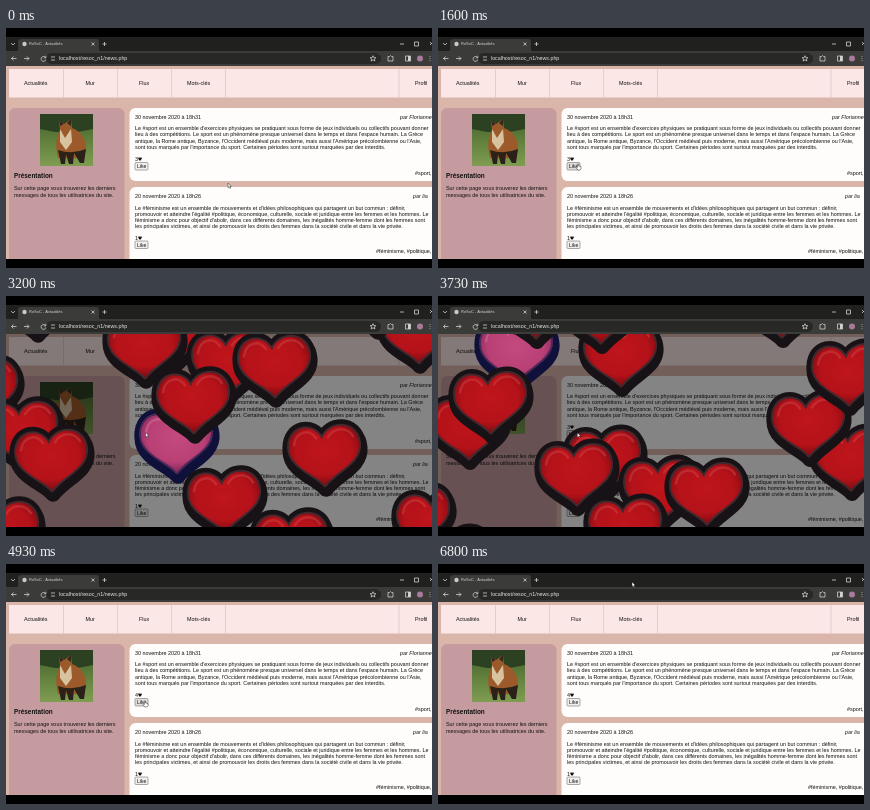
An HTML page for the animation above (6.87 s loop, 426 px wide and 240 px high).

```html
<!DOCTYPE html>
<html lang="fr">
<head>
<meta charset="utf-8">
<title>Actualités</title>
<style>
html, body { margin: 0; width: 100%; height: 100%; overflow: hidden; background: #000; }
svg { display: block; width: 100vw; height: 100vh; }
text { font-family: "Liberation Sans", Arial, sans-serif; font-size: 5.42px; fill: #111; white-space: pre; }
.bold { font-size: 6.4px; font-weight: bold; }
.it { font-style: italic; }
.ui { font-size: 4px; fill: #d8d8d4; }
.url { font-size: 5.3px; fill: #e4e4e0; }
.icon { fill: none; stroke: #d0d0cc; stroke-width: .8; }
.like { fill: #efefef; stroke: #77736c; stroke-width: .6; }
.label { font-size: 5px; }
.sym { font-family: "DejaVu Sans", sans-serif; font-size: 5px; }
</style>
</head>
<body>
<svg viewBox="0 0 426 240" preserveAspectRatio="none">
  <defs>
    <clipPath id="view"><rect y="38" width="426" height="193"/></clipPath>
    <clipPath id="photo"><rect x="34" y="86" width="53" height="52"/></clipPath>
    <radialGradient id="red" cx=".5" cy=".42" r=".62">
      <stop offset="0" stop-color="#c0151c"/><stop offset=".65" stop-color="#b51219"/><stop offset="1" stop-color="#780a10"/>
    </radialGradient>
    <radialGradient id="pink" cx=".5" cy=".42" r=".62">
      <stop offset="0" stop-color="#c44a7e"/><stop offset=".65" stop-color="#b84075"/><stop offset="1" stop-color="#7b2455"/>
    </radialGradient>
    <linearGradient id="grass" x2="0" y2="1">
      <stop offset="0" stop-color="#3f5a2c"/><stop offset=".45" stop-color="#5d7c3a"/><stop offset="1" stop-color="#7f9d52"/>
    </linearGradient>
    <path id="shape" d="M1 29C-8 18-35 11-35-9C-35-30-11-35-2-17C4-35 33-36 35-13C37 6 14 13 1 29Z"/>
    <path id="gloss" fill="none" stroke-linecap="round" stroke-width="2.500" d="M-30-11C-28-25-15-28-8-18M4-19C10-29 23-30 29-20"/>
  </defs>

  <g clip-path="url(#view)">
    <g id="page">
      <rect y="38" width="426" height="193" fill="#dab6aa"/>
      <rect x="3" y="41" width="423" height="28.5" fill="#fbe7e6"/>
      <path d="M57.5 41v28.5M111.5 41v28.5M165.5 41v28.5M219.5 41v28.5M393 41v28.5" stroke="#e8c3cb" stroke-width=".8"/>
      <rect x="3" y="80" width="115.5" height="165" rx="6" fill="#c69b9f"/>
      <g clip-path="url(#photo)">
        <rect x="34" y="86" width="53" height="52" fill="url(#grass)"/>
        <path d="M34 86h53v15q-26 7-53 0z" fill="#2c4022"/>
        <path d="M52 130C49 118 50 108 54 102L53 92L58 96L65 91L66 100C75 103 81 112 80 122L76 130Z" fill="#9c5a2a"/>
        <path d="M54 101l5 9l6-9l1 13l-6 8l-6-8z" fill="#d8c3a0"/>
        <path d="M52 122l3 14h4l1-10l3 10h4l1-11l6 10h4l2-14q-14 6-28 1z" fill="#2a2118"/>
        <path d="M53 92l1.500 6l3-2zM65 91l-4 4l4 3z" fill="#35261a"/>
      </g>
      <rect x="123.5" y="80" width="315" height="73" rx="6" fill="#fefdfc"/>
      <rect x="123.5" y="159" width="315" height="85" rx="6" fill="#fefdfc"/>
      <g id="copy"></g>
      <rect id="like" class="like" x="129" y="134.5" width="13" height="7.5" rx="1"/>
      <rect class="like" x="129" y="213" width="13" height="7.5" rx="1"/>
      <text class="label" x="131" y="140">Like</text>
      <text class="label" x="131" y="218.5">Like</text>
      <text id="count" x="129" y="133">3</text>
      <text x="129" y="212">1</text>
      <text class="sym" x="131.7" y="133">♥</text>
      <text class="sym" x="131.7" y="212">♥</text>
    </g>
    <g id="rain">
      <rect y="38" width="426" height="193" fill="#000" opacity=".48"/>
      <g id="hearts"></g>
    </g>
  </g>

  <g id="chrome">
    <rect y="9" width="426" height="15" fill="#20211f"/>
    <path d="M10 24q2 0 2-3v-7q0-3 3-3h75q3 0 3 3v7q0 3 2 3z" fill="#3b3c39"/>
    <rect y="23" width="426" height="15" fill="#3b3c39"/>
    <rect x="40" y="25" width="335" height="11" rx="5.5" fill="#282926"/>
    <circle cx="18.5" cy="16" r="2.2" fill="#c9c9c5"/>
    <text class="ui" x="23" y="17.4">ReSoC - Actualités</text>
    <path class="icon" d="M5 15l2 2l2-2M85.5 14.5l3 3m0-3l-3 3M96.5 16h4m-2-2v4M394 16h4M408.5 14h4v4h-4zM424 14l3 3m0-3l-3 3"/>
    <path class="icon" d="M10.5 30.5h-5m2-2l-2 2l2 2M18 30.5h5m-2-2l2 2l-2 2M40 29M39.500 29.500a2.400 2.400 0 1 0 .4 2M39.900 27.800v2h-2"/>
    <path class="icon" d="M45 29h4M45 32h4"/>
    <text class="url" x="53" y="32.3">localhost/resoc_n1/news.php</text>
    <path class="icon" d="M367 27.7l.9 2h2l-1.6 1.3l.6 2l-1.9-1.2l-1.9 1.2l.6-2l-1.6-1.3h2z"/>
    <path class="icon" d="M382 28.5h1.5q1-2 2 0h1.5v4.5h-5zM399.5 28h5v5h-5z"/>
    <path d="M402 28h2.5v5H402z" fill="#d0d0cc"/>
    <circle cx="414" cy="30.5" r="3" fill="#a8799b"/>
    <path class="icon" d="M424 28v.8m0 1.4v.8m0 1.4v.8"/>
  </g>
  <g id="cursor" stroke="#111" stroke-width=".45" fill="#fff">
    <path id="arrow" d="M0 0v4.7l1.1-1l.8 1.7l.8-.4l-.8-1.7h1.5z"/>
    <path id="hand" d="M-.7 0q.7-.8 1.3 0v2l2.3.5l.2 2l-1 1.5h-2.3l-2-2.5l.6-.5l.9.6z"/>
  </g>
</svg>
<script>
const LOOP = 6870, RAIN_START = 2600, RAIN_END = 4700;
const FALL = 0.24, POSE = 3200;      // px per ms, time of the listed heart places
const TOP = -346, CYCLE = 640;       // hearts leave below and come back above
const NS = "http://www.w3.org/2000/svg";
const $ = id => document.getElementById(id);

function add(parent, tag, attrs, text) {
  const el = document.createElementNS(NS, tag);
  for (const k in attrs) el.setAttribute(k, attrs[k]);
  if (text) el.textContent = text;
  parent.append(el);
  return el;
}

function write(x, y, lines, cls = "", gap = 6.35) {
  lines.forEach((line, i) => add($("copy"), "text", { x, y: y + i * gap, class: cls }, line));
}

const nav = { "Actualités": 18, "Mur": 79.5, "Flux": 133, "Mots-clés": 181, "Profil": 409 };
for (const label in nav) write(nav[label], 57, [label]);
write(8, 150, ["Présentation"], "bold");
write(8, 162.3, ["Sur cette page vous trouverez les derniers", "messages de tous les utilisatrices du site."]);
write(129, 90.6, ["30 novembre 2020 à 18h31"]);
write(394, 90.6, ["par Florianne"], "it");
write(129, 102, [
  "Le #sport est un ensemble d'exercices physiques se pratiquant sous forme de jeux individuels ou collectifs pouvant donner",
  "lieu à des compétitions. Le sport est un phénomène presque universel dans le temps et dans l'espace humain. La Grèce",
  "antique, la Rome antique, Byzance, l'Occident médiéval puis moderne, mais aussi l'Amérique précolombienne ou l'Asie,",
  "sont tous marqués par l'importance du sport. Certaines périodes sont surtout marquées par des interdits."
]);
write(409, 147, ["#sport,"]);
write(129, 169.5, ["20 novembre 2020 à 18h26"]);
write(407, 169.5, ["par lia"], "it");
write(129, 181.5, [
  "Le #féminisme est un ensemble de mouvements et d'idées philosophiques qui partagent un but commun : définir,",
  "promouvoir et atteindre l'égalité #politique, économique, culturelle, sociale et juridique entre les femmes et les hommes. Le",
  "féminisme a donc pour objectif d'abolir, dans ces différents domaines, les inégalités homme-femme dont les femmes sont",
  "les principales victimes, et ainsi de promouvoir les droits des femmes dans la société civile et dans la vie privée."
], "", 6.25);
write(370, 225, ["#féminisme, #politique,"]);

// x, y, 1 for pink; painted back to front
const hearts = [
  [30, 6, 0], [-25, 95, 0], [166, 38, 0], [138, 52, 0], [15, 137, 0], [412, 37, 0],
  [222, 68, 0], [268, 71, 0], [170, 147, 1], [187, 107, 0], [318, 160, 0],
  [45, 165, 0], [218, 206, 0], [427, 228, 0], [285, 248, 0], [-4, 237, 0],
  [425, -213, 0], [345, -208, 1], [182, -67, 0], [78, -71, 1], [97, -115, 0],
  [162, -110, 0], [343, -116, 0], [370, 3, 0], [410, -48, 0], [52, -20, 0],
  [150, -302, 0], [262, -318, 1], [35, -330, 0], [390, -345, 0]
].map(([x, y, pink]) => {
  const el = add($("hearts"), "g", {});
  const edge = pink ? "#10113a" : "#171216";
  const use = attrs => add(el, "use", { href: "#shape", "stroke-linejoin": "round", ...attrs });
  use({ transform: "translate(1 4)", fill: edge, stroke: edge, "stroke-width": 15 });
  use({ fill: edge, stroke: edge, "stroke-width": 13 });
  use({ stroke: pink ? "#4a2858" : "#43282e", "stroke-width": 4 });
  use({ fill: pink ? "url(#pink)" : "url(#red)" });
  add(el, "use", { href: "#gloss", stroke: pink ? "#d979a2" : "#d0484c", opacity: 0.45 });
  return { el, x, y };
});

// time, x, y of the pointer
const path = [
  [0, 222, 155], [300, 221, 154], [1450, 140, 136], [5000, 139, 137], [5850, 194, 18]
];
const ease = p => p * p * (3 - 2 * p);

function pointer(t) {
  const i = path.findIndex(p => p[0] > t);
  if (i < 0) return path.at(-1).slice(1);
  const [t0, x0, y0] = path[i - 1], [t1, x1, y1] = path[i];
  const p = ease((t - t0) / (t1 - t0));
  return [x0 + (x1 - x0) * p, y0 + (y1 - y0) * p];
}

const show = (el, on) => { el.style.display = on ? "" : "none"; };
const wrap = y => ((y - TOP) % CYCLE + CYCLE) % CYCLE + TOP;

function draw() {
  const t = performance.now() % LOOP;
  const raining = t >= RAIN_START && t < RAIN_END;
  show($("rain"), raining);
  for (const { el, x, y } of hearts)
    el.setAttribute("transform", `translate(${x} ${wrap(y + (t - POSE) * FALL)})`);

  const [x, y] = pointer(t);
  const hover = x < 143 && y > 133 && y < 143;
  $("cursor").setAttribute("transform", `translate(${x} ${y})`);
  show($("hand"), hover && !raining);
  show($("arrow"), !hover || raining);
  $("like").style.fill = hover ? "#dedede" : "";
  $("count").textContent = t < RAIN_END ? "3" : "4";
  requestAnimationFrame(draw);
}
draw();
</script>
</body>
</html>
```
